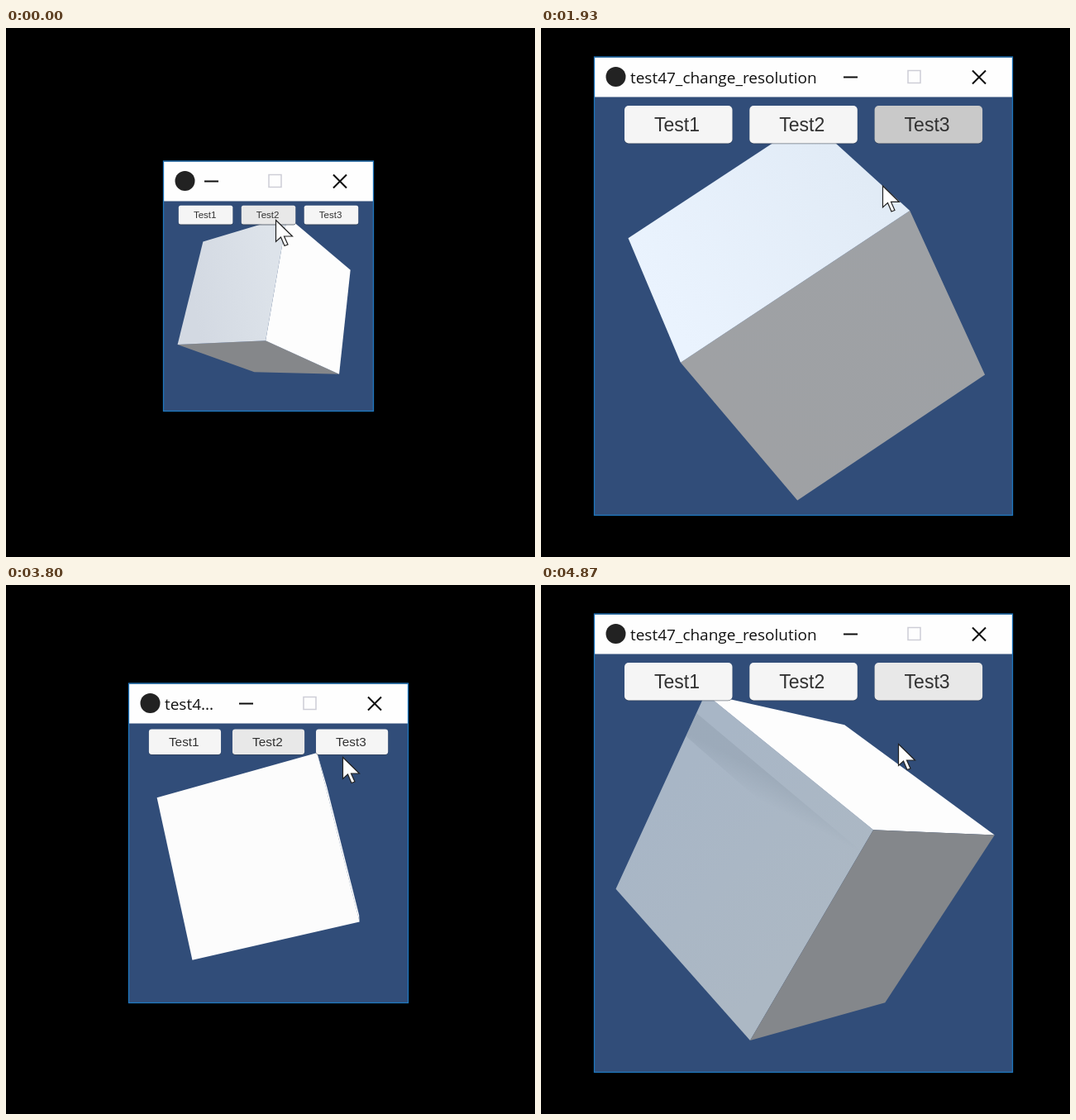
Animation, 640 px wide and 640 px high, one loop 4.94 s. Source, as an HTML page with a canvas:

```html
<!DOCTYPE html>
<html lang="en">
<head>
<meta charset="utf-8">
<title>Window resolution demo</title>
<style>
  html, body { margin: 0; width: 100%; height: 100%; overflow: hidden; background: #000; }
  canvas { display: block; width: 640px; height: 640px; }
</style>
</head>
<body>
<canvas id="stage" width="640" height="640"></canvas>
<script>
const ctx = document.getElementById('stage').getContext('2d');
const LOOP = 4940, STEP = 200 / 3;
const CX = 317.5, CY = 336.5;

// Window sizes: step at which each begins, client side, title, button that triggers it
const SMALL = { side: 254, title: '', button: 0 };
const MEDIUM = { side: 338, title: 'test4...', button: 1 };
const LARGE = { side: 506, title: 'test47_change_resolution', button: 2 };
const STAGES = [[0, SMALL], [18, MEDIUM], [28, LARGE], [42, SMALL], [53, MEDIUM], [64, LARGE]];

const POINTER = [
  [0, 326, 232], [17, 326, 232], [21, 403, 223], [25, 422, 192], [28, 422, 192],
  [36, 212, 156], [40, 202, 138], [43, 202, 138], [50, 322, 228], [53, 322, 228],
  [57, 407, 208], [61, 432, 192], [74, 432, 192]
];

// Camera looking at a unit cube that turns about (1, 2, 3)
const FOCAL = 3.784, DISTANCE = 3.58;
const AXIS = [1, 2, 3].map(v => v / Math.sqrt(14));

// Face: normal axis, sign, gradient axis, colour keys [step, colour at +, colour at -]
const FACES = [
  { axis: 2, sign: -1, ramp: 1, keys: [
    [0, '#85878a', '#85878a'], [21, '#73757a', '#73757a'], [36, '#c4c8cb', '#c6c8c8'],
    [42, '#dce8f2', '#e4eaec'], [57, '#fcfcfc', '#fcfcfc'], [63, '#d4e6f6', '#d8e6f2'],
    [73, '#a8b6c6', '#acb8c4']] },
  { axis: 0, sign: -1, ramp: 1, keys: [
    [0, '#fdfdfd', '#fdfdfd'], [21, '#fdfdfd', '#fdfdfd'], [36, '#c9dcf0', '#d9eaff'],
    [42, '#a6b0ba', '#a8bacb']] },
  { axis: 0, sign: 1, ramp: 1, keys: [[57, '#fdfdfd', '#fdfdfd'], [73, '#fdfdfd', '#fdfdfd']] },
  { axis: 1, sign: -1, ramp: 0, keys: [
    [0, '#d3d9e2', '#dde3ea'], [21, '#b4bac4', '#b4bac4'], [63, '#95989d', '#8f9296'],
    [73, '#84878b', '#84878b']] }
];

const mix = (a, b, k) => a + (b - a) * k;

function span(keys, step) {
  let i = 0;
  while (i < keys.length - 2 && keys[i + 1][0] <= step) i++;
  const a = keys[i], b = keys[i + 1];
  return [a, b, Math.max(0, Math.min(1, (step - a[0]) / (b[0] - a[0])))];
}

function blend(a, b, k) {
  const part = (hex, i) => parseInt(hex.substr(1 + 2 * i, 2), 16);
  return `rgb(${[0, 1, 2].map(i => Math.round(mix(part(a, i), part(b, i), k))).join()})`;
}

function gradient(from, to, first, last) {
  const fill = ctx.createLinearGradient(...from, ...to);
  fill.addColorStop(0, first);
  fill.addColorStop(1, last);
  return fill;
}

function polygon(points) {
  ctx.beginPath();
  points.forEach(p => ctx.lineTo(p[0], p[1]));
  ctx.closePath();
}

function line(...points) {
  ctx.beginPath();
  points.forEach((p, i) => i % 2 ? ctx.lineTo(...p) : ctx.moveTo(...p));
  ctx.stroke();
}

function rotation(angle) {
  const c = Math.cos(angle), s = Math.sin(angle), [x, y, z] = AXIS;
  const cross = [[0, z, -y], [-z, 0, x], [y, -x, 0]];
  return cross.map((row, i) => row.map((v, j) =>
    (i === j ? c : 0) + s * v + (1 - c) * AXIS[i] * AXIS[j]));
}

function drawCube(step, side) {
  // The turn loses one step while the window first grows
  const degrees = 65.7 - 3.04 * (73 - step) + (step < 18 ? 3.04 : 0);
  const axes = rotation(degrees * Math.PI / 180);
  const project = p => {
    const [x, y, z] = [0, 1, 2].map(i => p[0] * axes[0][i] + p[1] * axes[1][i] + p[2] * axes[2][i]);
    const scale = FOCAL * side / 2 / (DISTANCE + z);
    return [CX + x * scale, CY - 1 - y * scale];
  };

  for (const { axis, sign, ramp, keys } of FACES) {
    if (sign * axes[axis][2] * DISTANCE + 0.5 >= 0) continue;
    const other = 3 - axis - ramp;
    const at = (r, o) => {
      const p = [];
      p[axis] = sign / 2; p[ramp] = r; p[other] = o;
      return project(p);
    };
    const [a, b, k] = span(keys, step);
    ctx.fillStyle = gradient(at(0.5, 0), at(-0.5, 0), blend(a[1], b[1], k), blend(a[2], b[2], k));
    polygon([at(0.5, 0.5), at(0.5, -0.5), at(-0.5, -0.5), at(-0.5, 0.5)]);
    ctx.fill();

    // Faint shade along one edge of the front face
    if (axis === 2 && step > 30 && (step < 50 || step > 59)) {
      const edge = (inset, v) => step < 50 ? at(0.5 - inset, v) : at(v, 0.5 - inset);
      ctx.fillStyle = gradient(edge(0.09, 0), edge(0.2, 0), 'rgba(120,135,150,.25)', 'rgba(120,135,150,0)');
      polygon([edge(0.09, -0.5), edge(0.09, 0.5), edge(0.2, 0.5), edge(0.2, -0.5)]);
      ctx.fill();
    }
  }
}

function buttonColour(index, step, current) {
  const pressed = STAGES.some(([start, s]) =>
    start > 0 && s.button === index && step >= start - 2 && step <= start + 2);
  if (pressed) return '#c9c9c9';
  const selected = step < 18 ? 1 : current.button;
  return index === selected ? '#e8e8e8' : '#f5f5f5';
}

function drawButtons(step, stage) {
  const k = stage.side / 506;
  const top = CY - stage.side / 2 + 10.5 * k;
  ctx.font = `${23 * k}px "Liberation Sans", Arial, sans-serif`;
  ctx.textAlign = 'center';
  ctx.textBaseline = 'alphabetic';
  for (let i = 0; i < 3; i++) {
    const left = CX + (-216.5 + 151.3 * i) * k;
    const shape = (y, colour) => {
      ctx.fillStyle = colour;
      ctx.beginPath();
      ctx.roundRect(left, y, 130.5 * k, 45.5 * k, 5 * k);
      ctx.fill();
    };
    shape(top + 0.8, 'rgba(50,60,75,.7)');
    shape(top, buttonColour(i, step, stage));
    ctx.fillStyle = '#323232';
    ctx.fillText('Test' + (i + 1), left + 63.5 * k, top + 31 * k);
  }
}

function drawWindow(step, stage) {
  const { side, title } = stage;
  const left = CX - side / 2 + 0.5, right = left + side - 1;
  const client = CY - side / 2, top = client - 48, mid = top + 23.5;

  ctx.fillStyle = '#fefefe';
  ctx.fillRect(left, top, side, 49);
  ctx.fillStyle = '#314d79';
  ctx.fillRect(left, client, side, side);

  ctx.save();
  ctx.beginPath();
  ctx.rect(left, client, side, side);
  ctx.clip();
  drawCube(step, side);
  ctx.restore();
  drawButtons(step, stage);

  ctx.fillStyle = '#222';
  ctx.beginPath();
  ctx.arc(left + 25.5, mid, 12, 0, 7);
  ctx.fill();

  ctx.fillStyle = '#111';
  ctx.font = '19px "Open Sans", "Noto Sans", sans-serif';
  ctx.textAlign = 'left';
  ctx.fillText(title, left + 43, mid + 8);

  ctx.lineWidth = 2;
  ctx.strokeStyle = '#0c0c0c';
  line([right - 204, mid + 0.5], [right - 187, mid + 0.5]);
  const x = right - 40;
  line([x - 8, mid - 7.5], [x + 8, mid + 8.5], [x + 8, mid - 7.5], [x - 8, mid + 8.5]);
  ctx.lineWidth = 1.5;
  ctx.strokeStyle = '#cdcdd6';
  ctx.strokeRect(right - 126, mid - 7.5, 15, 15);

  ctx.lineWidth = 1.3;
  ctx.strokeStyle = '#1f78c0';
  ctx.strokeRect(left - 0.5, top - 0.5, side, side + 48.5);
}

function drawPointer(step) {
  const [a, b, k] = span(POINTER, step);
  const ease = k * k * (3 - 2 * k);
  ctx.save();
  ctx.translate(mix(a[1], b[1], ease) + 0.5, mix(a[2], b[2], ease) + 0.5);
  polygon([[0, 0], [0, 26], [6, 20.5], [10.5, 31], [14.5, 29.5], [10, 19.5], [20, 19.5]]);
  ctx.fillStyle = '#fefefe';
  ctx.fill();
  ctx.lineWidth = 1.2;
  ctx.strokeStyle = '#222';
  ctx.stroke();
  ctx.restore();
}

function draw(now) {
  const step = Math.min(73, Math.floor((now % LOOP + 3.5) / STEP));
  const stage = STAGES.filter(s => s[0] <= step).pop()[1];
  ctx.fillStyle = '#000';
  ctx.fillRect(0, 0, 640, 640);
  drawWindow(step, stage);
  drawPointer(step);
}

const start = performance.now();
function tick() {
  draw(performance.now() - start);
  requestAnimationFrame(tick);
}
tick();
</script>
</body>
</html>
```
